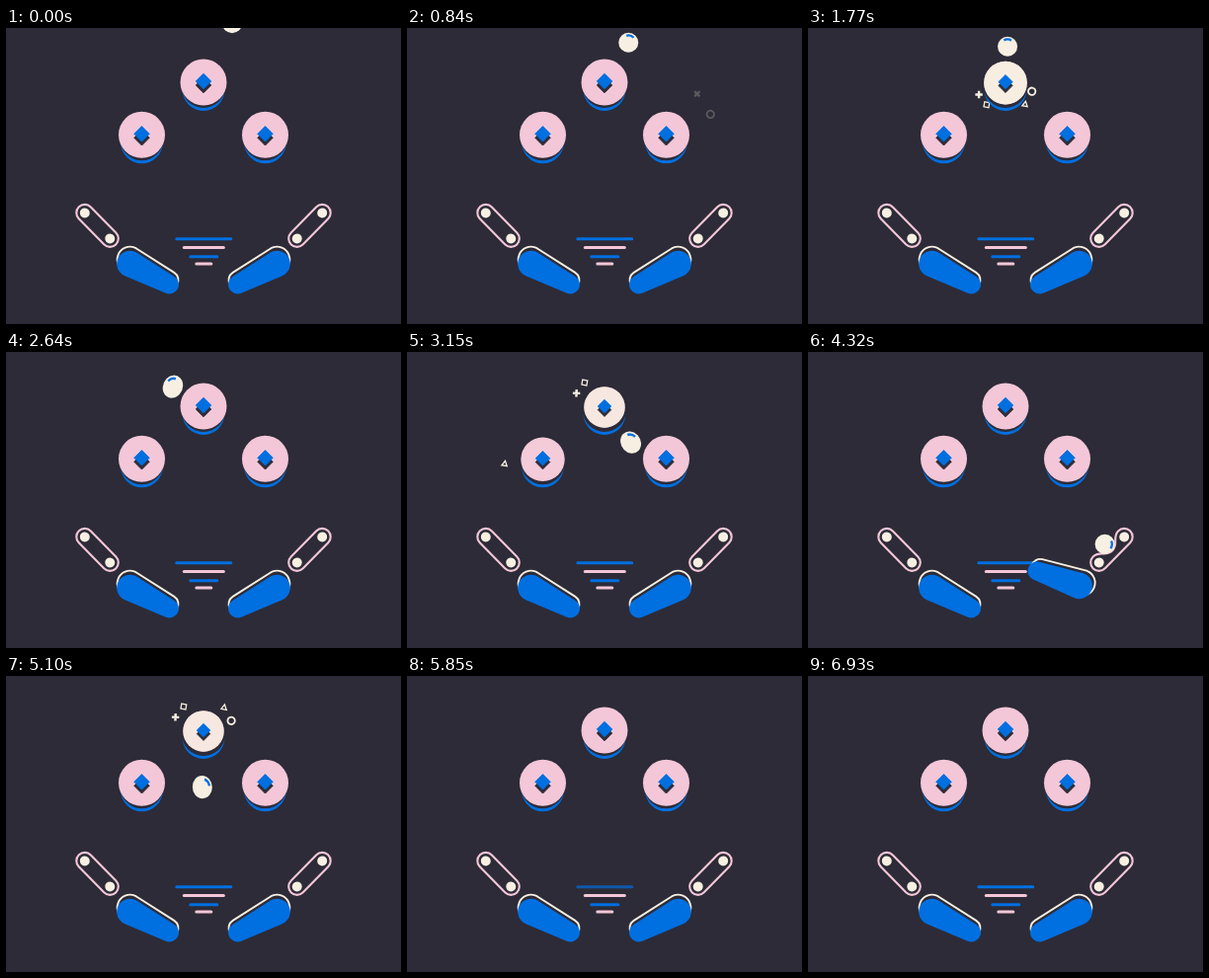
Animation of 400 by 300 pixels, one loop 7170 ms. Source, as an HTML page with a canvas:

```html
<!DOCTYPE html>
<html lang="en">
<head>
<meta charset="utf-8">
<title>Pinball</title>
<style>
html, body { margin: 0; width: 100%; height: 100%; overflow: hidden; background: #2d2b37; }
canvas { display: block; width: 400px; height: 300px; }
</style>
</head>
<body>
<canvas id="stage" width="400" height="300"></canvas>
<script>
const ctx = document.getElementById('stage').getContext('2d');
const LOOP = 7170, RAD = Math.PI / 180, BALL = 10;
const BG = '#2d2b37', BLUE = '#006fe0', PINK = '#f3c7d8', CREAM = '#f7f0e2';

// Ball path: time, x, y, spin. Bounces alternate with the point in between.
const path = [
  [0, 229, -5, 0], [180, 232, 33, 0],
  [330, 238, 86, 0], [840, 224.3, 14.8, 5],
  [1735, 203, 22, -8], [2640, 169, 35, -22],
  [2920, 154, 79, -20], [3000, 186, 74, -10],
  [3080, 219, 82, -5], [3170, 228, 94, 0],
  [3260, 231, 104, 0], [3400, 172, 140, 0],
  [3540, 108.4, 189.5, 0], [3565, 104, 194, 2],
  [3590, 102, 196, 5], [3860, 185, 150, 30],
  [4150, 262, 216, 60], [4235, 284, 203, 75],
  [4320, 301, 195, 85], [4510, 225, 180, 60],
  [4700, 142, 217, 30], [4860, 175, 150, 30],
  [5030, 200, 88, 35], [5100, 198.8, 112.2, 40],
  [5380, 250, 221, 60], [5540, 220, 241, 40],
  [5700, 206, 312, 0]
];

const bumpers = [
  { x: 200, y: 55, hits: [1735, 3080, 5030] },
  { x: 137.5, y: 108.3, hits: [2920] },
  { x: 262.5, y: 108.3, hits: [330, 3260] }
];

// Sparks: shape, angle
const topLeft = [['plus', 205], ['square', 230]];
const topRight = [['triangle', -48], ['ring', -19]];
const below = [['plus', 155], ['square', 130], ['triangle', 48], ['ring', 19]];
const left = [['triangle', 173]];
const right = [['plus', -53], ['ring', -25]];
const bursts = [
  [330, bumpers[2], right], [1735, bumpers[0], below], [2920, bumpers[1], left],
  [3080, bumpers[0], topLeft], [3260, bumpers[2], right],
  [5030, bumpers[0], topLeft.concat(topRight)]
];

const clamp = (v, lo = 0, hi = 1) => Math.min(hi, Math.max(lo, v));
const ramp = (t, a, b) => { const u = clamp((t - a) / (b - a)); return u * u * (3 - 2 * u); };

// Parabola through three points
function curve(t, a, b, c, k) {
  const [p, q, r] = [a[0], b[0], c[0]];
  return a[k] * (t - q) * (t - r) / ((p - q) * (p - r)) +
         b[k] * (t - p) * (t - r) / ((q - p) * (q - r)) +
         c[k] * (t - p) * (t - q) / ((r - p) * (r - q));
}

function ballAt(t) {
  if (t >= 5700) return { x: 206, y: 330, hidden: true };
  let i = 0;
  while (path[i + 2][0] <= t) i += 2;
  const [a, b, c] = path.slice(i, i + 3);
  const at = (k, time = t) => curve(time, a, b, c, k);
  const vx = at(1, t + 1) - at(1), vy = at(2, t + 1) - at(2);
  const ends = clamp((t - a[0]) / 110) * clamp((c[0] - t) / 60);
  const stretch = clamp((Math.hypot(vx, vy) - 0.09) * 4, 0, 0.25) * ends;
  return { x: at(1), y: at(2), spin: at(3), dir: Math.atan2(vy, vx), stretch };
}

function disc(x, y, r, fill) {
  ctx.fillStyle = fill;
  ctx.beginPath();
  ctx.arc(x, y, r, 0, 7);
  ctx.fill();
}

function stroke(color, width) {
  ctx.strokeStyle = color;
  ctx.lineWidth = width;
  ctx.stroke();
}

function placed(x, y, angle, draw) {
  ctx.save();
  ctx.translate(x, y);
  ctx.rotate(angle);
  draw();
  ctx.restore();
}

function mirrored(draw) {
  ctx.save();
  ctx.translate(400, 0);
  ctx.scale(-1, 1);
  draw();
  ctx.restore();
}

function diamond(y, fill) {
  ctx.fillStyle = ctx.strokeStyle = fill;
  ctx.lineWidth = 1;
  ctx.beginPath();
  ctx.moveTo(0, y - 7.7);
  ctx.lineTo(7.7, y);
  ctx.lineTo(0, y + 7.7);
  ctx.lineTo(-7.7, y);
  ctx.closePath();
  ctx.fill();
  ctx.stroke();
}

function bumper({ x, y, hits }, t) {
  const age = Math.min(...hits.map(h => t >= h ? t - h : 9999));
  const size = 1 - 0.12 * clamp(age / 60) * clamp(1 - (age - 70) / 300);
  placed(x, y, 0, () => {
    disc(0, 7.6, 21.4, BLUE);
    disc(0, 4, 22, BG);
    ctx.translate(0, 8 * (1 - size));
    ctx.scale(size, size);
    disc(0, 0, 23.5, PINK);
    ctx.globalAlpha = clamp(1 - (age - 30) / 220);
    disc(0, 0, 23.5, CREAM);
    ctx.globalAlpha = 1;
    diamond(3, BG);
    diamond(-1, BLUE);
  });
}

function spark(shape) {
  ctx.beginPath();
  if (shape === 'plus') {
    ctx.moveTo(-3.7, 0); ctx.lineTo(3.7, 0);
    ctx.moveTo(0, -3.7); ctx.lineTo(0, 3.7);
  } else if (shape === 'square') {
    ctx.rect(-2.5, -2.5, 5, 5);
  } else if (shape === 'triangle') {
    ctx.moveTo(0, -2.8); ctx.lineTo(2.7, 2.2); ctx.lineTo(-2.7, 2.2); ctx.closePath();
  } else {
    ctx.arc(0, 0, 3.7, 0, 7);
  }
  stroke(CREAM, shape === 'plus' ? 2.4 : shape === 'ring' ? 1.8 : 1.3);
}

function burst(age, { x, y }, sparks) {
  if (age < 0 || age > 650) return;
  ctx.globalAlpha = clamp((650 - age) / 370) ** 1.5;
  const reach = 28 + 0.047 * age;
  for (const [shape, deg] of sparks) {
    const r = reach * (shape === 'ring' ? 0.95 : 1);
    const turn = shape === 'plus' ? Math.max(0, age - 50) * 0.1 : 10;
    placed(x + r * Math.cos(deg * RAD), y + r * Math.sin(deg * RAD),
      turn * RAD, () => spark(shape));
  }
  ctx.globalAlpha = 1;
}

// Elastic band around two pins, pushed in by the ball
function slingshot(bx, by) {
  const len = 36.4, r = 8.5, tilt = Math.atan2(26, 25.5);
  const dx = bx - 79.8, dy = by - 187.4;
  const along = dx * Math.cos(tilt) + dy * Math.sin(tilt);
  const out = dx * Math.sin(tilt) - dy * Math.cos(tilt);
  const near = along > 0 && along < len && out > 0;
  const dent = near ? clamp(r + BALL - out, 0, 14) : 0;
  placed(79.8, 187.4, tilt, () => {
    const q = len / 4, low = dent - r;
    ctx.beginPath();
    ctx.moveTo(0, -r);
    ctx.bezierCurveTo(q, -r, q, low, 2 * q, low);
    ctx.bezierCurveTo(3 * q, low, 3 * q, -r, len, -r);
    ctx.arc(len, 0, r, -Math.PI / 2, Math.PI / 2);
    ctx.arc(0, 0, r, Math.PI / 2, Math.PI * 1.5);
    ctx.closePath();
    stroke(PINK, 2.1);
    disc(0, 0, 5, CREAM);
    disc(len, 0, 5, CREAM);
  });
}

function paddle(y, big, small) {
  const th = Math.atan2(21, 40);
  const off = Math.acos((big - small) / Math.hypot(40, 21));
  ctx.beginPath();
  ctx.arc(2.5, y, big, th + off, th - off + 2 * Math.PI);
  ctx.arc(42.5, y + 21, small, th - off, th + off);
  ctx.closePath();
}

function flipper(lift) {
  placed(123, 238, -47 * RAD * lift, () => {
    paddle(-3.5, 12.8, 9);
    stroke(CREAM, 1.9);
    paddle(1, 13.3, 9.5);
    ctx.fillStyle = BLUE;
    ctx.fill();
  });
}

function lines(t) {
  [27.5, 20, 13.5, 7.5].forEach((half, i) => {
    const y = [213.8, 222.5, 231.7, 239][i];
    const dip = (start, time) => Math.sin(Math.PI * clamp((t - start - i * 55) / time));
    ctx.globalAlpha = 1 - dip(5800, 500) - dip(6520, 230);
    ctx.beginPath();
    ctx.moveTo(200.3 - half, y);
    ctx.lineTo(200.3 + half, y);
    ctx.lineCap = 'round';
    stroke(i % 2 ? PINK : BLUE, 3);
    ctx.lineCap = 'butt';
  });
  ctx.globalAlpha = 1;
}

function drawBall(b) {
  if (b.hidden) return;
  placed(b.x, b.y, b.dir, () => {
    ctx.scale(1 + b.stretch, 1);
    ctx.rotate(-b.dir);
    disc(0, 0, BALL, CREAM);
    const mid = (b.spin - 80) * RAD;
    ctx.beginPath();
    ctx.arc(0, 0, 7.2, mid - 0.55, mid + 0.55);
    stroke(BLUE, 2.3);
  });
}

function draw(t) {
  const ball = ballAt(t);
  ctx.fillStyle = BG;
  ctx.fillRect(0, 0, 400, 300);
  lines(t);
  slingshot(ball.x, ball.y);
  mirrored(() => slingshot(400 - ball.x, ball.y));
  flipper(ramp(t, 4670, 4740) - ramp(t, 4850, 4980));
  mirrored(() => flipper(ramp(t, 4120, 4190) - ramp(t, 4400, 4520)));
  bursts.forEach(([hit, from, sparks]) => burst(t - hit, from, sparks));
  bumpers.forEach(b => bumper(b, t));
  drawBall(ball);
}

const begin = performance.now();
function tick() {
  draw((performance.now() - begin) % LOOP);
  requestAnimationFrame(tick);
}
tick();
</script>
</body>
</html>
```
